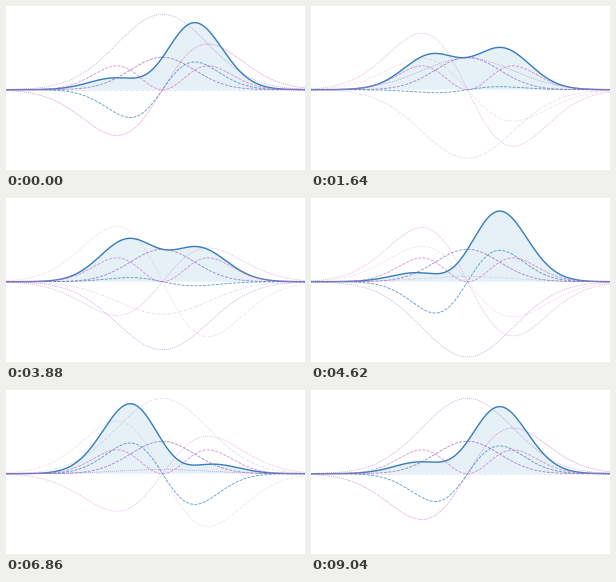
Animation of 299 by 164 pixels, one loop 9060 ms. Source, as a matplotlib script:

```python
import matplotlib.pyplot as plt
import numpy as np
from matplotlib.animation import FuncAnimation

# Superposition of the two lowest harmonic oscillator states
W, H, DPI = 299, 164, 64
FRAMES, STEP = 453, 20
CX, AXIS, WIDTH = 156.5, 83.7, 45.6
AMP, DENSITY = 75.4, 32.4
PX = 72 / DPI

BLUE, PURPLE, PINK = "#2b78b8", "#8d62bb", "#cf70c4"

plt.rcParams["lines.scale_dashes"] = False

x = np.linspace(0, W, 600)
u = (x - CX) / WIDTH
psi0 = np.exp(-u**2 / 2)
psi1 = np.sqrt(2) * u * psi0

fig = plt.figure(figsize=(W / DPI, H / DPI), dpi=DPI, facecolor="white")
ax = fig.add_axes([0, 0, 1, 1])
ax.set(xlim=(0, W), ylim=(H, 0))
ax.axis("off")


def curve(color, width, dash=None, alpha=1.0):
    style = (0, [d * PX for d in dash]) if dash else "-"
    line, = ax.plot(x, np.full_like(x, AXIS), color=color, lw=width * PX,
                    ls=style, alpha=alpha, dash_capstyle="butt")
    return line


def show(line, values, scale):
    line.set_ydata(AXIS - scale * values)


DASH, DOT, DASHDOT = (3, 1.3), (1, 1), (2.6, 1, 0.8, 1)

area, = ax.fill(x, np.full_like(x, AXIS), color="#e6f0f7", lw=0)
re0 = curve(PURPLE, 0.7, DOT, 0.6)
im0 = curve(PURPLE, 0.6, DASHDOT, 0.33)
re1 = curve(PINK, 0.7, DOT, 0.6)
im1 = curve(PINK, 0.6, DASHDOT, 0.33)
total = curve(BLUE, 1.4, alpha=0.95)
cross = curve(BLUE, 0.85, DASH, 0.75)
show(curve(PURPLE, 0.85, DASH, 0.75), psi0**2, DENSITY)
show(curve(PINK, 0.85, DASH, 0.75), psi1**2, DENSITY)


def update(i):
    # the last frame closes the cycle on the first pose
    turn = 2 * np.pi * i / (FRAMES - 1)
    wave0 = psi0 * np.exp(-1j * turn)
    wave1 = psi1 * np.exp(1j * (np.pi / 4 - 3 * turn))
    density = np.abs(wave0 + wave1)**2

    show(re0, wave0.real, AMP)
    show(im0, wave0.imag, AMP)
    show(re1, wave1.real, AMP)
    show(im1, wave1.imag, AMP)
    show(cross, 2 * (wave0 * wave1.conj()).real, DENSITY)
    show(total, density, DENSITY)

    top = np.column_stack([x, AXIS - DENSITY * density])
    area.set_xy(np.vstack([[0, AXIS], top, [W, AXIS]]))
    return area, re0, im0, re1, im1, total, cross


anim = FuncAnimation(fig, update, frames=FRAMES, interval=STEP,
                     repeat=True, repeat_delay=0, blit=False)
plt.show()
```
